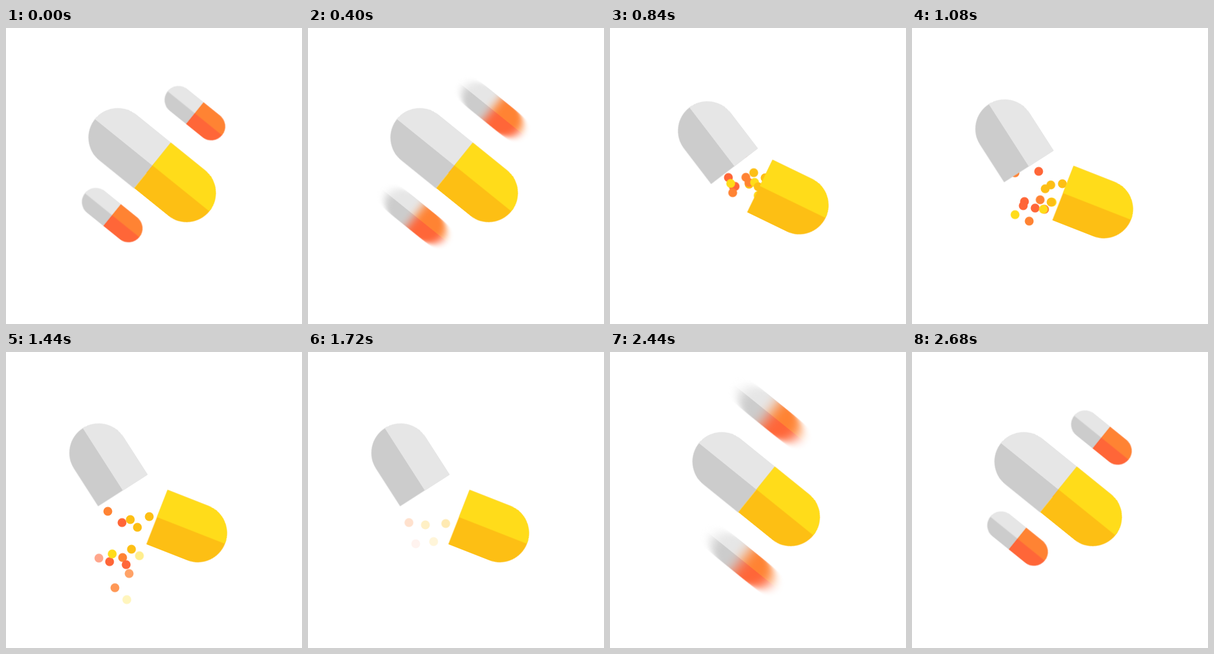
These frames come from a looping animation (500x500 px, 2880 ms). An HTML page without scripts:

```html
<!DOCTYPE html>
<html lang="en">
<head>
<meta charset="utf-8">
<title>Capsules</title>
<style>
  html, body { margin: 0; width: 100%; height: 100%; overflow: hidden; background: #fff; }
  svg { display: block; width: 100vw; height: 100vh; }

  .light { fill: #e6e6e6; }
  .grey { fill: #ccc; }
  .yellow { fill: #ffdc1a; }
  .amber { fill: #fdbf14; }
  .orange { fill: #ff8333; }
  .red { fill: #ff6638; }

  /* Small capsules wind up, shoot off along their axis and come back */
  .pill { animation: shoot 2.88s infinite, smear 2.88s step-end infinite; }
  .upper { --back: 35px; --away: -420px; }
  .lower { --back: -43px; --away: 420px; }
  @keyframes shoot {
    0%, 6.25% { transform: translateX(0); animation-timing-function: ease-in-out; }
    11.46% { transform: translateX(var(--back)); animation-timing-function: cubic-bezier(.3, 0, .6, .58); }
    22.22%, 77.78% { transform: translateX(var(--away)); animation-timing-function: cubic-bezier(.4, .42, .7, 1); }
    88.54% { transform: translateX(var(--back)); animation-timing-function: ease-in-out; }
    93.75%, 100% { transform: translateX(0); }
  }
  @keyframes smear {
    0%, 88.2%, 100% { filter: none; }
    11.8%, 86.3% { filter: url(#slow); }
    13.7%, 85.07% { filter: url(#medium); }
    14.93% { filter: url(#fast); }
  }

  /* Halves of the big capsule */
  .half { animation: open 2.88s cubic-bezier(.33, 0, .67, 1) infinite; }
  .shell {
    --shut: translate(247.1px, 232.2px) rotate(38.9deg);
    --wide: translate(197px, 233.5px) rotate(57.3deg);
  }
  .cup {
    --shut: translate(247.9px, 232.4px) rotate(38.9deg);
    --wide: translate(255.5px, 279px) rotate(21.4deg);
  }
  @keyframes open {
    0%, 20.83% { transform: var(--shut); }
    33.33%, 68.75% { transform: var(--wide); }
    81.94%, 100% { transform: var(--shut); }
  }

  /* Grains drift by (--x, --y) three times over, each fading at its own moment */
  .grains circle {
    r: 7.5px;
    animation: drift 2.88s linear infinite, fade 2.88s linear var(--late) infinite;
  }
  @keyframes drift {
    0%, 25% { transform: var(--start, translate(0, 0)); }
    37.5% { transform: translate(var(--x), var(--y)); }
    62.5% { transform: translate(calc(3 * var(--x)), calc(3 * var(--y))); }
    62.51%, 100% { transform: var(--start, translate(0, 0)); }
  }
  @keyframes fade {
    0%, 50% { opacity: 1; }
    58.33%, 90% { opacity: 0; }
    90.01%, 100% { opacity: 1; }
  }
</style>
</head>
<body>
<svg viewBox="0 0 500 500">
  <defs>
    <path id="body" d="M-.5-49.5H75a49.5 49.5 0 0 1 0 99H-.5z"/>
    <path id="top" d="M-.5-49.5H75A49.5 49.5 0 0 1 124.5 0H-.5z"/>
    <g id="white" transform="scale(-1 1)">
      <use href="#body" class="grey"/>
      <use href="#top" class="light"/>
    </g>
    <g id="small" transform="scale(.474)">
      <use href="#white"/>
      <use href="#body" class="red"/>
      <use href="#top" class="orange"/>
    </g>
    <filter id="slow" x="-50%" width="200%" color-interpolation-filters="sRGB"><feGaussianBlur stdDeviation="4 0"/></filter>
    <filter id="medium" x="-50%" width="200%" color-interpolation-filters="sRGB"><feGaussianBlur stdDeviation="7.5 0"/></filter>
    <filter id="fast" x="-50%" width="200%" color-interpolation-filters="sRGB"><feGaussianBlur stdDeviation="10.5 0"/></filter>
  </defs>

  <g class="grains">
    <circle class="orange" cx="176" cy="220" style="--x:-2px;--y:24.5px;--late:.1s"/>
    <circle class="red" cx="232" cy="196" style="--x:-18px;--y:46px;--late:.06s"/>
    <circle class="amber" cx="266" cy="248" style="--x:-12px;--y:15px;--late:.12s"/>
    <circle class="amber" cx="247" cy="234" style="--x:-12.5px;--y:31px;--late:.08s"/>
    <circle class="amber" cx="240" cy="260" style="--x:-15px;--y:11.5px;--late:.1s"/>
    <circle class="red" cx="205" cy="232" style="--x:-15px;--y:61px;--late:.01s"/>
    <circle class="red" cx="219" cy="252" style="--x:-31px;--y:48px;--late:-.1s"/>
    <circle class="orange" cx="236" cy="233" style="--x:-19.5px;--y:57px;--late:.01s"/>
    <circle class="red" cx="213" cy="249" style="--x:-5px;--y:55px;--late:0s"/>
    <circle class="orange" cx="240" cy="238" style="--x:-16px;--y:68px;--late:-.06s"/>
    <circle class="yellow" cx="264.5" cy="271" style="--x:-42.5px;--y:35px;--late:.01s"/>
    <circle class="yellow" cx="248" cy="244" style="--x:-11.3px;--y:50px;--late:-.12s"/>
    <circle class="amber" cx="258" cy="255" style="--x:-23px;--y:39px;--late:.03s"/>
    <circle class="yellow" cx="144" cy="212" style="--start:translate(75px,24px);--x:30px;--y:103px;--late:-.17s"/>
    <circle class="orange" cx="212" cy="254" style="--x:-14px;--y:72px;--late:-.04s"/>
  </g>

  <g class="half shell"><use href="#white"/></g>
  <g class="half cup">
    <g transform="scale(.987 .994)">
      <use href="#body" class="amber"/>
      <use href="#top" class="yellow"/>
    </g>
  </g>

  <g transform="translate(319 144) rotate(38.9)"><g class="pill upper"><use href="#small"/></g></g>
  <g transform="translate(179.3 316.2) rotate(38.9)"><g class="pill lower"><use href="#small"/></g></g>
</svg>
</body>
</html>
```
